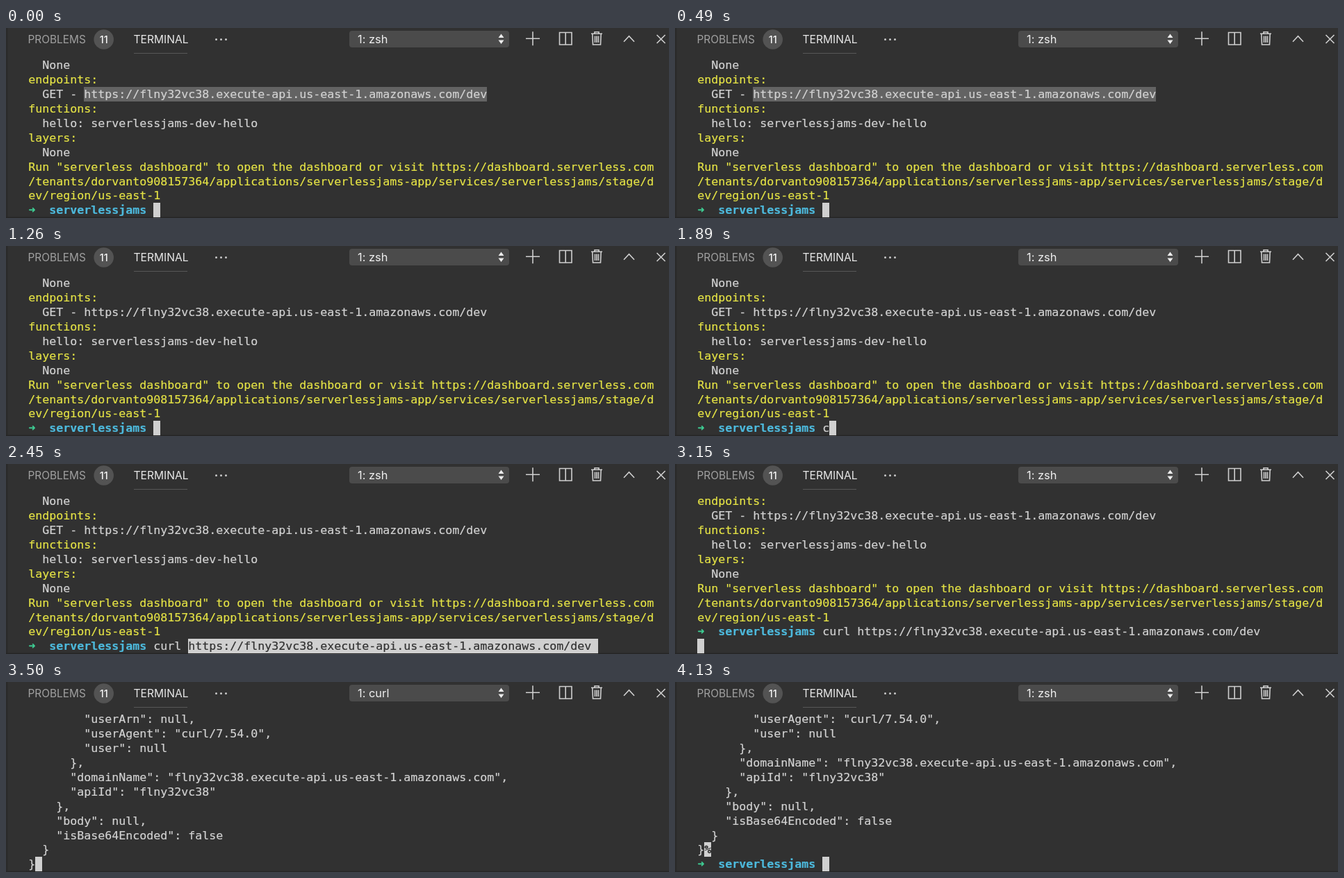
These frames come from a looping animation (954x274 px, 4410 ms). An HTML page:

```html
<!DOCTYPE html>
<html lang="en">
<head>
<meta charset="utf-8">
<title>Terminal</title>
<style>
  html, body { margin: 0; width: 100%; height: 100%; overflow: hidden; background: #313131; }
  #stage { position: relative; width: 954px; height: 274px; overflow: hidden; background: #313131; }
  #stage > svg { position: absolute; inset: 0; }
  svg text { font-family: Inter, sans-serif; }
  /* The line height exceeds the row height to seat the text lower than its background. */
  #screen {
    position: absolute; left: 32.2px; top: 43.4px; margin: 0;
    font: 16.61px/22.9px "DejaVu Sans Mono", monospace;
    -webkit-text-stroke: 0.2px;
    color: #d2d2d2; white-space: pre;
  }
  #screen div { height: 20.9px; }
  #screen span { display: inline-block; height: 20.9px; vertical-align: top; }
  .yellow { color: #e5e345; }
  .arrow { width: 10px; color: #3fcf95; font-weight: bold; }
  .dir { color: #4db9dc; font-weight: bold; }
  .selected { background: #636363; }
  .inverse { background: #d0d0d0; color: #313131; }
  .cursor { width: 10px; background: #d0d0d0; }
</style>
</head>
<body>
<div id="stage">
  <svg width="954" height="274" fill="none">
    <path d="M0 0h2.5v274h-2.5z" fill="#2a2a2a"/>
    <path d="M0 272.5h954v1.5h-954z" fill="#262626"/>
    <text x="31.5" y="22" font-size="15.4" fill="#a0a0a0">PROBLEMS</text>
    <circle cx="140.7" cy="16.5" r="14.3" fill="#535353"/>
    <text x="140.7" y="21.5" font-size="14.5" font-weight="500" fill="#f2f2f2" text-anchor="middle">11</text>
    <text x="183.5" y="22" font-size="15.6" fill="#e8e8e8">TERMINAL</text>
    <path d="M184 36.5h77" stroke="#585858"/>
    <g fill="#c8c8c8">
      <circle cx="302.5" cy="16.5" r="1.5"/><circle cx="309.5" cy="16.5" r="1.5"/><circle cx="316.5" cy="16.5" r="1.5"/>
    </g>
    <rect x="494" y="4" width="230" height="24" rx="4" fill="#4b4b4b"/>
    <text id="title" x="506" y="21.5" font-size="16.4" fill="#efefef"></text>
    <path d="M708.5 14l4-5.5 4 5.5zM708.5 17.5l4 5.5 4-5.5z" fill="#ececec"/>
    <g stroke="#cfcfcf" stroke-width="1.6">
      <path d="M748 15.2h20M758 5.2v20"/>
      <path d="M796.5 6.5h17.5v17.5h-17.5zM805.2 6.5v17.5"/>
      <path d="M842 8.3h16M847 8.3v-2.6h6v2.6M843.8 8.3l.7 15.7h11l.7-15.7M847.5 11.5v9.5M850 11.5v9.5M852.5 11.5v9.5"/>
      <path d="M889 19.7l7.5-8 7.5 8"/>
      <path d="M936.5 10l12 12M948.5 10l-12 12"/>
    </g>
  </svg>
  <div id="screen"></div>
</div>
<script>
const LOOP = 4410, ROWS = 11;
const T = { deselect: 1260, paste: 2450, enter: 3150, running: 3360, output: 3500, prompt: 3570, idle: 3640 };
const KEYS = [["c", 1890], ["u", 1960], ["r", 2100], ["l", 2170], [" ", 2240]];

const span = (cls, text = "") => `<span class="${cls}">${text}</span>`;
const yellow = text => span("yellow", text);
const cursor = span("cursor");
const prompt = `${span("arrow", "➜")}  ${span("dir", "serverlessjams")} `;

const apiId = "flny32vc38";
const host = `${apiId}.execute-api.us-east-1.amazonaws.com`;
const url = `https://${host}/dev`;

const deployLog = selected => [
  "  None",
  yellow("endpoints:"),
  "  GET - " + (selected ? span("selected", url) : url),
  yellow("functions:"),
  "  hello: serverlessjams-dev-hello",
  yellow("layers:"),
  "  None",
  yellow('Run "serverless dashboard" to open the dashboard or visit https://dashboard.serverless.com'),
  yellow("/tenants/dorvanto908157364/applications/serverlessjams-app/services/serverlessjams/stage/d"),
  yellow("ev/region/us-east-1"),
];

const response = [
  '        "userArn": null,',
  '        "userAgent": "curl/7.54.0",',
  '        "user": null',
  "      },",
  `      "domainName": "${host}",`,
  `      "apiId": "${apiId}"`,
  "    },",
  '    "body": null,',
  '    "isBase64Encoded": false',
  "  }",
];

function linesAt(t) {
  if (t >= T.prompt) return [...response, "}" + span("inverse", "<b>%</b>"), prompt + cursor];
  if (t >= T.output) return [...response, "}" + cursor];
  const log = deployLog(t < T.deselect);
  if (t >= T.enter) return [...log, `${prompt}curl ${url}`, cursor];
  const typed = KEYS.filter(([, at]) => t >= at).map(([key]) => key).join("");
  const pasted = t >= T.paste ? span("inverse", url) : "";
  return [...log, prompt + typed + pasted + cursor];
}

const screen = document.getElementById("screen");
const title = document.getElementById("title");
let shown = "";

function draw(now) {
  const t = now % LOOP;
  const html = linesAt(t).slice(-ROWS).map(line => `<div>${line}</div>`).join("");
  if (html !== shown) screen.innerHTML = shown = html;
  title.textContent = t >= T.running && t < T.idle ? "1: curl" : "1: zsh";
  requestAnimationFrame(draw);
}
draw(0);
</script>
</body>
</html>
```
